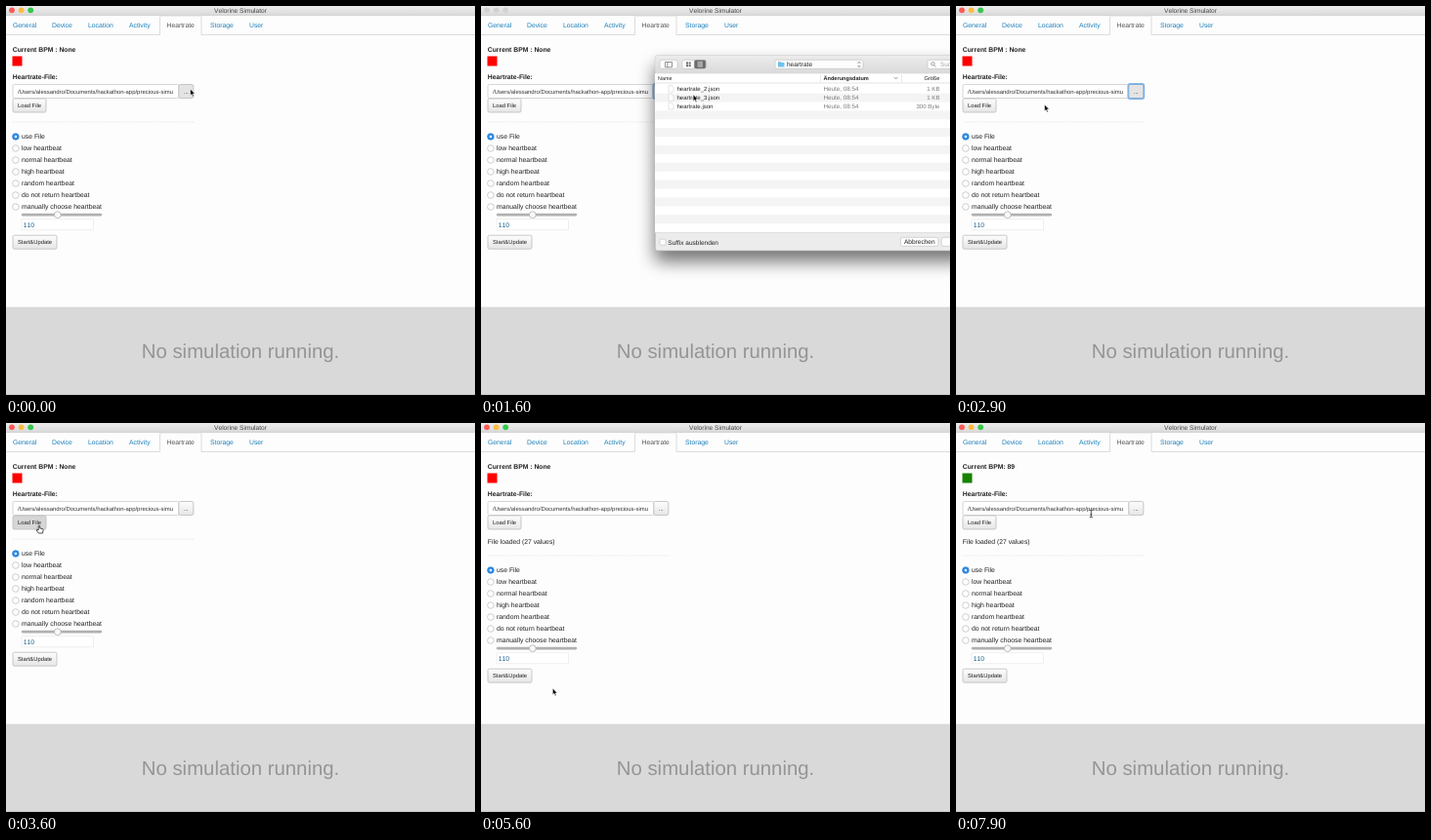
Recreate the animation shown at these times as an HTML page. Size 480 px wide and 399 px high, loop 8 s.

```html
<!DOCTYPE html>
<html lang="en">
<head>
<meta charset="utf-8">
<title>Heartrate panel</title>
<style>
html, body { margin: 0; width: 100%; height: 100%; overflow: hidden; background: #fdfdfd; }
svg { display: block; width: 100vw; height: 100vh; }
text { font-family: "Liberation Sans", Arial, sans-serif; font-kerning: none; text-rendering: geometricPrecision; white-space: pre; }
</style>
</head>
<body>
<svg id="stage" viewBox="0 0 480 399" preserveAspectRatio="none">
  <defs>
    <linearGradient id="bar" x2="0" y2="1"><stop stop-color="#ececec"/><stop offset="1" stop-color="#dadada"/></linearGradient>
    <linearGradient id="btn" x2="0" y2="1"><stop stop-color="#fdfdfd"/><stop offset="1" stop-color="#e6e6e6"/></linearGradient>
    <filter id="shade" x="-20%" y="-20%" width="140%" height="150%"><feGaussianBlur stdDeviation="9"/></filter>
  </defs>
</svg>
<script>
const LOOP = 8000, STEP = 100, SHIFT = 17;
const OPEN = 500, CLOSE = 1800, LOADED = 3800, STARTED = 6100, BLUR = 7300;
const INK = "#222", LIGHTS = ["#fc5b57", "#fdbc40", "#34c84a"];
const stage = document.getElementById("stage");

function add(parent, tag, attrs) {
  const el = document.createElementNS("http://www.w3.org/2000/svg", tag);
  for (const key in attrs) el.setAttribute(key, attrs[key]);
  return parent.appendChild(el);
}
const group = parent => add(parent, "g", {});
const rect = (p, x, y, width, height, fill, more) => add(p, "rect", { x, y, width, height, fill, ...more });
const path = (p, d, stroke, width, more) => add(p, "path", { d, stroke, fill: "none", "stroke-width": width, ...more });
const circle = (p, cx, cy, r, fill, more) => add(p, "circle", { cx, cy, r, fill, ...more });
function text(p, x, y, str, size, fill = INK, more) {
  const el = add(p, "text", { x, y, "font-size": size, fill, ...more });
  el.textContent = str;
  return el;
}
const BOLD = { "font-weight": "bold" }, MID = { "text-anchor": "middle" }, END = { "text-anchor": "end" };
const show = (el, on) => el.setAttribute("display", on ? "inline" : "none");

function button(p, x, y, w, h, label) {
  const ring = rect(p, x - .4, y - .4, w + .8, h + .8, "none", { rx: 2, stroke: "#7db4ea", "stroke-width": 2 });
  const face = rect(p, x, y, w, h, "url(#btn)", { rx: 1.5, "stroke-width": .8 });
  text(p, x + w / 2, y + h / 2 + 2, label, 5.85, INK, MID);
  return (hover, focus, down) => {
    show(ring, focus);
    face.setAttribute("stroke", focus ? "#7fa8d0" : "#bcbcbc");
    face.setAttribute("fill", down ? "#d6d6d6" : hover || focus ? "#e4e4e4" : "url(#btn)");
  };
}

// Window frame and tabs
rect(stage, 0, 0, 480, 399, "#fdfdfd");
rect(stage, 0, 0, 480, 9.5, "url(#bar)");
rect(stage, 0, 9.2, 480, .6, "#c4c4c4");
const lights = LIGHTS.map((c, i) => circle(stage, 6 + i * 9.6, 4.3, 2.9, c));
text(stage, 240, 6.8, "Velorine Simulator", 6.6, "#444", MID);
path(stage, "M0 29.5H157.5V11.5Q157.5 10 159 10H198.5Q200 10 200 11.5V29.5H480", "#d8d8d8", .9);
[["General", 7], ["Device", 47], ["Location", 84], ["Activity", 126], ["Heartrate", 164.5], ["Storage", 209], ["User", 249]]
  .forEach(([name, x]) => text(stage, x, 22, name, 6.8, name === "Heartrate" ? "#555" : "#1a7fba"));

// File section
const bpm = text(stage, 6.8, 46.6, "", 6.8, INK, BOLD);
const lamp = rect(stage, 6.5, 51.5, 10, 10, "#f00");
text(stage, 6.8, 75.4, "Heartrate-File:", 6.8, INK, BOLD);
rect(stage, 7, 80.5, 170, 14, "#fff", { rx: 1.5, stroke: "#ccc", "stroke-width": .8 });
text(stage, 12, 89.6, "/Users/alessandro/Documents/hackathon-app/precious-simu", 5.94, "#333");
const browse = button(stage, 176.8, 80.5, 15, 14, "...");
const load = button(stage, 7, 95, 34, 14, "Load File");
const note = text(stage, 6.8, 123.6, "File loaded (27 values)", 6.8);

// Choices, moved down once the note is visible
const form = group(stage);
path(form, "M7 119H192", "#e6e6e6", .8, { "stroke-dasharray": "2 1" });
["use File", "low heartbeat", "normal heartbeat", "high heartbeat", "random heartbeat", "do not return heartbeat", "manually choose heartbeat"]
  .forEach((label, i) => {
    const y = 134 + i * 12;
    circle(form, 9.9, y, 3.3, i ? "#fff" : "#2f8eea", { stroke: i ? "#bbb" : "#2478cc", "stroke-width": .7 });
    if (!i) circle(form, 9.9, y, 1.2, "#fff");
    text(form, 16, y + 2, label, 6.83);
  });
rect(form, 16, 213, 82, 2.2, "#b5b5b5", { rx: 1.1, stroke: "#999", "stroke-width": .4 });
circle(form, 52.8, 214.2, 3.4, "#f8f8f8", { stroke: "#aaa", "stroke-width": .7 });
rect(form, 16, 218.8, 73.5, 11, "#fff", { stroke: "#e9e9e9", "stroke-width": .7 });
text(form, 17.8, 226.5, "110", 6.8, "#17608f");
const start = button(form, 7, 235.2, 45, 14, "Start&Update");

// Status panel
rect(stage, 0, 308.7, 480, 90.3, "#d9d9d9");
rect(stage, 0, 398, 480, 1, "#c8c8c8");
text(stage, 240, 361.2, "No simulation running.", 20.35, "#959595", MID);

// File dialog
const dialog = group(stage);
rect(dialog, 178, 61, 320, 201, "#000", { opacity: .55, filter: "url(#shade)" });
rect(dialog, 178.3, 50.8, 320, 200.2, "#ececec", { rx: 2, stroke: "#b0b0b0", "stroke-width": .6 });
rect(dialog, 178.3, 50.8, 320, 18, "url(#bar)", { rx: 2 });
const pill = (p, x, y, w, h, fill = "#fdfdfd") =>
  rect(p, x, y, w, h, fill, { rx: 1.8, stroke: "#bdbdbd", "stroke-width": .6 });

const tools = add(dialog, "g", { transform: "translate(0 .5)" });
pill(tools, 183, 54.8, 18, 9);
path(tools, "M188.5 57H195.5V62.3H188.5ZM190.8 57V62.3", "#666", .7);
pill(tools, 206, 54.8, 12.5, 9);
pill(tools, 218.2, 54.8, 12, 9, "#6a6a6a");
for (let i = 0; i < 4; i++) rect(tools, 210 + i % 2 * 2.7, 57 + (i >> 1) * 2.7, 2, 2, "#666");
path(tools, "M221.5 57.3H227M221.5 59.3H227M221.5 61.3H227", "#fff", .8);
pill(tools, 301, 54.8, 90, 9);
rect(tools, 304, 56.8, 3, 2, "#5fb4e0");
rect(tools, 304, 57.4, 6.5, 4.6, "#70c3ec", { rx: .5 });
text(tools, 313, 61.4, "heartrate", 6.5);
path(tools, "M385.7 58.3L387 56.8L388.3 58.3M385.7 60.6L387 62.1L388.3 60.6", "#555", .7);
pill(tools, 457, 54.8, 40, 9);
circle(tools, 462.5, 58.8, 1.7, "none", { stroke: "#777", "stroke-width": .7 });
path(tools, "M463.7 60L465.4 61.9", "#777", .7);
text(tools, 470, 61.4, "Suchen", 6.4, "#aaa");

rect(dialog, 178, 69, 302, 163.5, "#fff");
for (let y = 89.6; y < 230; y += 17.8) rect(dialog, 178, y, 302, 8.9, "#f4f4f4");
path(dialog, "M178 69H480M178 79H480M178 232.5H480", "#d0d0d0", .6);
path(dialog, "M347.5 70V78M430.5 70V78", "#ddd", .6);
text(dialog, 181, 76.1, "Name", 5.4);
text(dialog, 350.5, 76.1, "Änderungsdatum", 5.6, INK, BOLD);
path(dialog, "M422.8 73L424.6 74.8L426.4 73", "#666", .7);
text(dialog, 469.5, 76.1, "Größe", 5.7, INK, END);
[["heartrate_2.json", "1 KB"], ["heartrate_3.json", "1 KB"], ["heartrate.json", "300 Byte"]].forEach(([name, size], i) => {
  const y = 87.2 + i * 8.9;
  path(dialog, `M192 ${y - 5.8}H195.2L197 ${y - 4}V${y + 1}H192Z`, "#c8c8c8", .5, { fill: "#fff" });
  text(dialog, 200.5, y, name, 6.05);
  text(dialog, 350.5, y, "Heute, 08:54", 6.3, "#7c7c7c");
  text(dialog, 469.5, y, size, 6.1, "#7c7c7c", END);
});
rect(dialog, 183, 239.2, 6, 6, "#fff", { rx: 1, stroke: "#bbb", "stroke-width": .6 });
text(dialog, 191.3, 244.5, "Suffix ausblenden", 6.5);
pill(dialog, 429.5, 237.3, 38.5, 9);
text(dialog, 448.8, 244, "Abbrechen", 6.55, INK, MID);
pill(dialog, 471.2, 237.3, 38, 9);

// Pointers, each with its hot spot at 0,0
const pointer = group(stage);
const shapes = {
  arrow: path(pointer, "M0 0V6.8L1.6 5.4L2.7 7.9L3.8 7.4L2.8 5H4.9Z", "#fff", .6, { fill: "#000" }),
  hand: path(pointer, "M-.8 .3Q0 -.6 .7 .3V2.8L3.6 3.4Q4.3 3.7 4.1 4.6L3.5 7.8H-.6L-3 4.6Q-2.5 3.6 -.8 4.8Z", "#222", .8, { fill: "#fff" }),
  beam: path(pointer, "M-1.6 -3.8Q0 -3.8 0 -2.8Q0 -3.8 1.6 -3.8M0 -2.8V2.8M-1.6 3.8Q0 3.8 0 2.8Q0 3.8 1.6 3.8M-.9 .9H.9", "#222", .8)
};

const route = [
  [0, 188.5, 85], [400, 184, 86.8], [1000, 183.7, 87], [1250, 183.7, 87], [1700, 222, 91.3], [2200, 222, 91.3],
  [3300, 34, 105.2], [4300, 34, 105.2], [5400, 73.3, 272], [5650, 73.3, 272], [6000, 40, 260], [6200, 40, 260],
  [6600, 77, 224.6], [7000, 77, 224.6], [7800, 138.3, 93], [8000, 138.3, 93]
];
function locate(t) {
  const i = route.findIndex(k => k[0] > t);
  const [t0, x0, y0] = route[i - 1], [t1, x1, y1] = route[i];
  const u = (t - t0) / (t1 - t0), e = u * u * (3 - 2 * u);
  return [x0 + (x1 - x0) * e, y0 + (y1 - y0) * e];
}

function draw(t) {
  const [x, y] = locate(t);
  const loaded = t >= LOADED, started = t >= STARTED, open = t >= OPEN && t < CLOSE;
  const dy = loaded ? SHIFT : 0;
  const over = (l, top, r, bottom) => !open && x >= l && x <= r && y >= top && y <= bottom;
  const onLoad = over(7, 95, 41, 109);
  const onStart = over(7, 235 + dy, 52, 249 + dy);
  const onLabel = over(6, 130 + dy, 98, 210 + dy);
  const kind = onLoad || onStart || onLabel ? "hand" : over(7, 80, 176, 95) ? "beam" : "arrow";

  bpm.textContent = started ? "Current BPM: 89" : "Current BPM : None";
  lamp.setAttribute("fill", started ? "#188200" : "#f00");
  lights.forEach((dot, i) => dot.setAttribute("fill", open ? "#d2d2d2" : LIGHTS[i]));
  show(note, loaded);
  show(dialog, open);
  form.setAttribute("transform", `translate(0 ${dy})`);
  browse(over(177, 80, 192, 95), t >= 400 && t < 3500);
  load(onLoad, false, onLoad && t >= 3500 && !loaded);
  start(onStart, started && t < BLUR);
  pointer.setAttribute("transform", `translate(${x} ${y})`);
  for (const name in shapes) show(shapes[name], name === kind);
}

const begin = performance.now();
function tick() {
  const t = (performance.now() - begin) % LOOP;
  draw(Math.floor(t / STEP) * STEP);
  requestAnimationFrame(tick);
}
tick();
</script>
</body>
</html>
```
